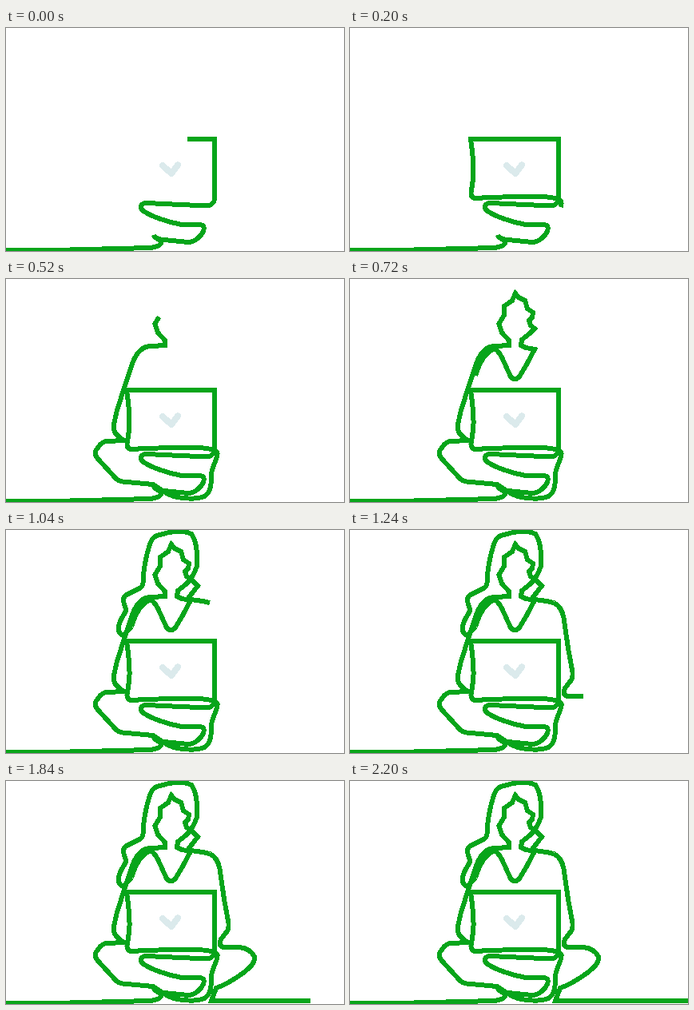
An HTML page that plays this animation: 423x279 px, repeating every 3200 ms.

```html
<!DOCTYPE html>
<html lang="en">
<head>
<meta charset="utf-8">
<title>One-line drawing</title>
<style>
html, body { margin: 0; width: 100%; height: 100%; overflow: hidden; background: #fff; }
svg { display: block; width: 423px; height: 279px; }
path { fill: none; shape-rendering: crispEdges; }
#chevron { stroke: #dbeaec; stroke-width: 8; stroke-linecap: round; stroke-linejoin: round; }
#line { stroke: #07a51a; stroke-width: 6; }
</style>
</head>
<body>
<svg viewBox="0 0 423 279">
  <path id="chevron" d="M196 172L207 182L215 171.500"/>
  <g id="line"></g>
</svg>
<script>
const LOOP = 3200, STEP = 40;

// Each stretch of the line, with the time at which the pen reaches its end.
const stretches = [
  // ground, feet, shin, right side of the laptop
  [0, `M-3 278L80 277.500L180 275C190 274 195 271 194 267C192 263 187 265 185 259
    C188 265 196 265 203 265.500L228 268C236 268 244 261 247 254C249 248 247 246 240 246
    L220 246C203 243 182 236 172 229C166 224 169 219 176 219L251 222.500
    C257 222 261 218 261 213V139H227`],
  // rest of the laptop, crossed leg, left knee
  [360, `M227 139H151C153 153 155 168 154.500 182C154 195 152 200 151.500 206Q151 213 158 213
    C185 211 215 211 235 211C250 211 261 213 264.500 217C266 224 257 235 257 245
    C257 261 255 268 248 272C239 276 222 275 210 272C198 268 192 262 184 257
    L146 253.500Q141 253 137 249L115 225C110 219 111 216 115 211`],
  // left arm, face, neckline
  [720, `M115 211Q120 203 127 203L147 202L139 195Q134 191 135 182L138.500 166L147 139L158 106
    C163 92 170 84 182 84L199 83V77L190 67L186.500 56L193 45V34L203 27L207 18
    L211 23L219 27L222 37L229 42L228 48L224 52L226 58L231 62L225 68L215 76L214 83
    L220 86L231 88L221 107L212 122Q206 129 201 122L190 98Q184 87 180 88
    C170 91 162 105 157 121`],
  // hair
  [1040, `M157 121L149 130Q144 134 141 126C139 117 147 108 150 101C150 95 146 91 147 86
    Q148 82 153 80L167 73Q171 71 171.500 66C172 50 175 33 180 18Q183 9 189 7
    L204 3Q222 0 232 5C238 13 239 25 239.500 40C239 49 235 55 231 61L240 70L229 84L231 87
    L246 89L255 91`],
  // right arm
  [1120, `M255 91C263 95 266 102 267.500 110L273 148`],
  [1240, `M273 148L278.500 178Q279 187 275 190L269 198Q265 207 273 208H292`],
  // right knee and ground
  [1560, `M292 208C302 209 308 214 311 220C312 227 306 233 297 240C286 248 275 255 263 259L257 275H312`],
  [1680, `M312 275H352`],
  [2200, `M352 275H424`],
];

const line = document.getElementById("line");
let total = 0;
const keys = stretches.map(([time, d]) => {
  const path = document.createElementNS("http://www.w3.org/2000/svg", "path");
  path.setAttribute("d", d);
  line.append(path);
  const from = total;
  total += path.getTotalLength();
  return { time, path, from, length: total };
});

const slope = (a, b) => (b.length - a.length) / (b.time - a.time);
keys.forEach((key, i) => {
  const before = keys[i - 1], after = keys[i + 1];
  key.speed = !before ? slope(key, after) : !after ? 0.03 : slope(before, after);
});

// Cubic Hermite interpolation keeps the pen's speed continuous.
function drawnLength(time) {
  const i = keys.findIndex(key => key.time > time);
  if (i < 0) return total;
  const a = keys[i - 1], b = keys[i];
  const span = b.time - a.time, u = (time - a.time) / span, v = 1 - u;
  return v * v * ((1 + 2 * u) * a.length + u * span * a.speed)
       + u * u * ((1 + 2 * v) * b.length - v * span * b.speed);
}

const start = performance.now();
function draw() {
  const elapsed = (performance.now() - start) % LOOP;
  const drawn = drawnLength(Math.floor(elapsed / STEP) * STEP);
  for (const { path, from, length } of keys) {
    path.style.display = drawn > from ? "" : "none";
    path.setAttribute("stroke-dasharray", drawn < length ? `${drawn - from} ${total}` : "none");
  }
  requestAnimationFrame(draw);
}
draw();
</script>
</body>
</html>
```
